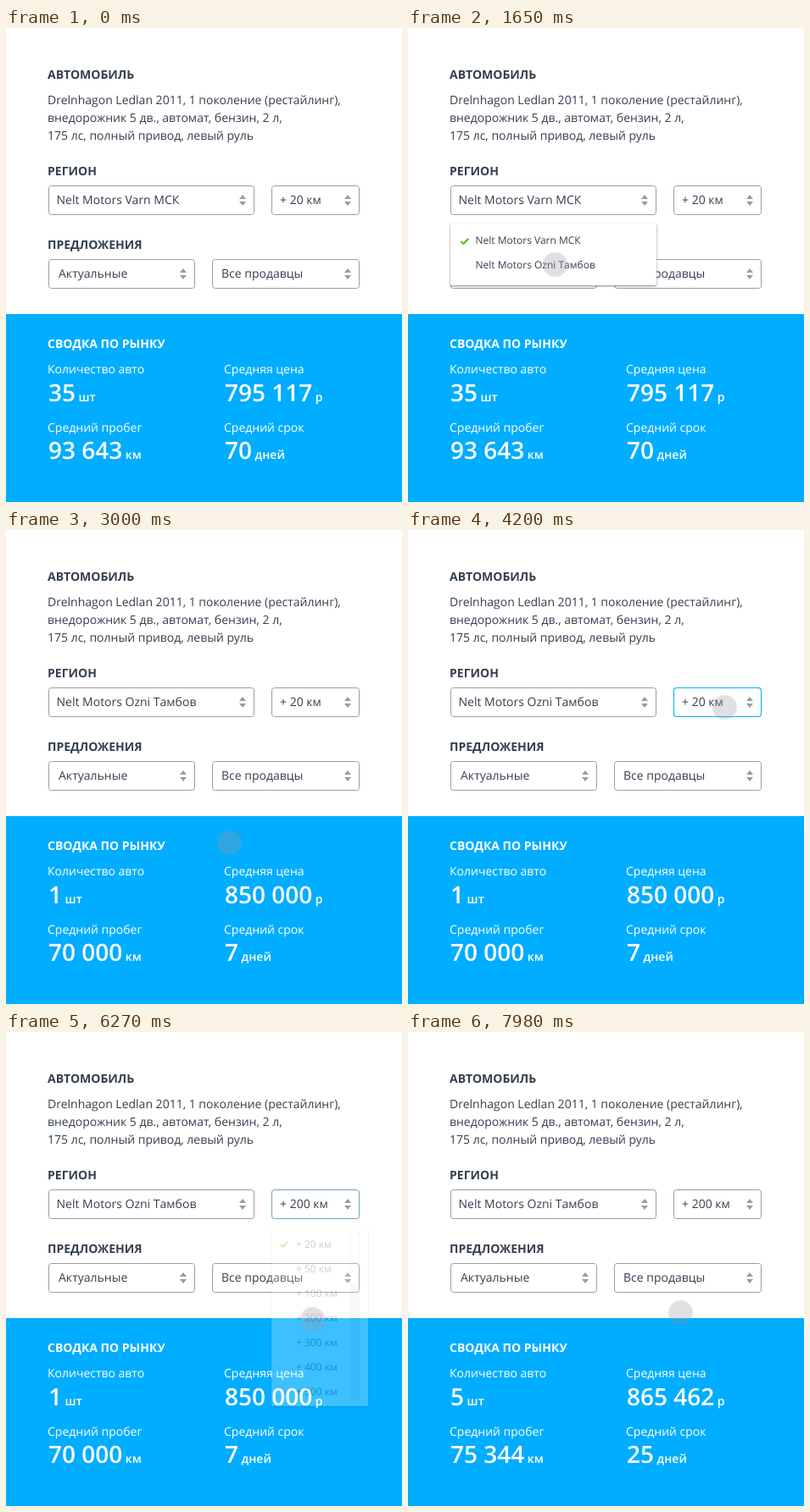
An HTML page for the animation above (8 s loop, 467 px wide and 560 px high).

```html
<!DOCTYPE html>
<html lang="ru">
<head>
<meta charset="utf-8">
<title>Сводка по рынку</title>
<style>
  html, body { margin: 0; width: 100%; height: 100%; overflow: hidden; background: #fff; }
  svg { display: block; width: 467px; height: 560px; font: 14px "Open Sans", sans-serif; fill: #343f4e; }
  text { white-space: pre; text-rendering: geometricPrecision; }
  .head { font-weight: 700; }
  .box { fill: #fff; stroke: #9b9ca3; }
  .focus { fill: none; stroke: #00adff; }
  .arrows { fill: #9a9ca1; }
  .panel { fill: #00adff; }
  .stats { fill: #fff; }
  .value { font-size: 28px; font-weight: 600; }
  .unit { font-size: 14px; }
  .menu { font-size: 12px; }
  .paper { fill: #fff; filter: drop-shadow(0 1px 1px rgba(0, 0, 0, .5)); }
  .tick { fill: none; stroke: #5fbe1b; stroke-width: 2.2; }
  .track { fill: #dfe4eb; }
  .thumb { fill: #fff; stroke: #d6dae0; }
  .grip { stroke: #d0d4da; }
  .cursor { fill: rgb(151, 153, 158); fill-opacity: .3; animation: cursor 8s ease-in-out infinite; }

  .region-menu { animation: region-menu 8s linear infinite; }
  .radius-menu { animation: radius-menu 8s linear infinite; }
  .region-focus { animation: region-focus 8s linear infinite; }
  .radius-focus { animation: radius-focus 8s linear infinite; }
  .region-old { animation: region-old 8s step-end infinite; }
  .region-new { animation: region-new 8s step-end infinite; }
  .radius-old { animation: radius-old 8s step-end infinite; }
  .radius-new { animation: radius-new 8s step-end infinite; }

  @keyframes cursor {
    0%, .2% { transform: translate(432.5px, 350.5px); opacity: 0; }
    1.5% { transform: translate(432.5px, 350.5px); opacity: 1; }
    5.625%, 18% { transform: translate(173.5px, 213.5px); }
    20.625%, 27.375% { transform: translate(173.5px, 279.5px); }
    30%, 48.75% { transform: translate(263.5px, 369.5px); }
    52.5%, 67.5% { transform: translate(373.5px, 209.5px); }
    69.375%, 99.74% { transform: translate(361.5px, 339.5px); }
    99.75%, 100% { transform: translate(321.5px, 331.5px); opacity: 1; }
  }
  @keyframes region-menu { 0%, 7.5%, 27.375%, 100% { opacity: 0; } 9%, 25.875% { opacity: 1; } }
  @keyframes radius-menu { 0%, 58.125%, 78.75%, 100% { opacity: 0; } 59.625%, 77.25% { opacity: 1; } }
  @keyframes region-focus { 0%, 4.875%, 20.25%, 100% { opacity: 0; } 5.625%, 18.375% { opacity: 1; } }
  @keyframes radius-focus { 0%, 51.375%, 78.75%, 100% { opacity: 0; } 52.4%, 77.25% { opacity: 1; } }
  @keyframes region-old { 0% { opacity: 1; } 26.625%, 100% { opacity: 0; } }
  @keyframes region-new { 0% { opacity: 0; } 26.625%, 100% { opacity: 1; } }
  @keyframes radius-old { 0% { opacity: 1; } 78%, 100% { opacity: 0; } }
  @keyframes radius-new { 0% { opacity: 0; } 78%, 100% { opacity: 1; } }
</style>
</head>
<body>
<svg viewBox="0 0 467 560">
  <defs>
    <path id="arrows" d="M-4-1.5h8L0-6.5zM-4 1.5h8L0 6.5z"/>
    <path id="tick" d="M0 3.5l3 3L8.8.2"/>
  </defs>

  <text class="head" x="49" y="60">АВТОМОБИЛЬ</text>
  <text x="49" y="90">Drelnhagon Ledlan 2011, 1 поколение (рестайлинг),</text>
  <text x="49" y="111">внедорожник 5 дв., автомат, бензин, 2 л,</text>
  <text x="49" y="132">175 лс, полный привод, левый руль</text>

  <text class="head" x="49" y="174">РЕГИОН</text>
  <rect class="box" x="50.5" y="186.5" width="242" height="34" rx="3"/>
  <rect class="focus region-focus" x="50.5" y="186.5" width="242" height="34" rx="3"/>
  <text class="region-old" x="59.5" y="208">Nelt Motors Varn МСК</text>
  <text class="region-new" x="59.5" y="208">Nelt Motors Ozni Тамбов</text>
  <rect class="box" x="313.5" y="186.5" width="103" height="34" rx="3"/>
  <rect class="focus radius-focus" x="313.5" y="186.5" width="103" height="34" rx="3"/>
  <text class="radius-old" x="323" y="208">+ 20 км</text>
  <text class="radius-new" x="323" y="208">+ 200 км</text>

  <text class="head" x="49" y="261">ПРЕДЛОЖЕНИЯ</text>
  <rect class="box" x="50.5" y="273.5" width="172" height="34" rx="3"/>
  <text x="62" y="295">Актуальные</text>
  <rect class="box" x="243.5" y="273.5" width="173" height="34" rx="3"/>
  <text x="254" y="295">Все продавцы</text>

  <g class="arrows">
    <use href="#arrows" x="279" y="203.5"/>
    <use href="#arrows" x="403" y="203.5"/>
    <use href="#arrows" x="209" y="290.5"/>
    <use href="#arrows" x="403" y="290.5"/>
  </g>

  <rect class="panel" y="338" width="467" height="222"/>
  <g class="stats" id="stats">
    <text class="head" x="49" y="378">СВОДКА ПО РЫНКУ</text>
  </g>

  <g class="menu region-menu">
    <rect class="paper" x="50" y="231" width="243" height="73" rx="2"/>
    <use class="tick" href="#tick" x="62.5" y="248.5"/>
    <text x="79.5" y="255">Nelt Motors Varn МСК</text>
    <text x="79.5" y="284">Nelt Motors Ozni Тамбов</text>
  </g>

  <g class="menu radius-menu" id="radius">
    <rect class="paper" x="313" y="231" width="114" height="211" rx="2"/>
    <use class="tick" href="#tick" x="323.5" y="247.5"/>
    <rect class="track" x="405" y="237" width="12" height="198" rx="2"/>
    <rect class="thumb" x="405.5" y="237.5" width="11" height="60" rx="2"/>
    <path class="grip" d="M408 264.5h6m-6 4h6m-6 4h6"/>
  </g>

  <circle class="cursor" r="14.5"/>
</svg>
<script>
  const LOOP = 8000, SWAP = 150, ROLLS = [2400, 6450];
  const STATS = [
    [49, 408, 441, 'Количество авто', 'шт', ['35', '1', '5']],
    [257, 408, 441, 'Средняя цена', 'р', ['795 117', '850 000', '865 462']],
    [49, 477, 509, 'Средний пробег', 'км', ['93 643', '70 000', '75 344']],
    [257, 477, 509, 'Средний срок', 'дней', ['70', '7', '25']]
  ];
  const shown = { opacity: 1, transform: 'translateY(0px)' };
  const raised = { opacity: 0, transform: 'translateY(-23px)' };
  const easing = 'cubic-bezier(.4, .2, .6, .8)';
  const key = (ms, pose) => ({ offset: ms / LOOP, easing, ...pose });

  function addText(parent, tag, x, y, content, className) {
    const node = document.createElementNS('http://www.w3.org/2000/svg', tag);
    if (x !== null) {
      node.setAttribute('x', x);
      node.setAttribute('y', y);
    }
    if (className) node.setAttribute('class', className);
    node.textContent = content;
    return parent.appendChild(node);
  }

  const radius = document.getElementById('radius');
  [20, 50, 100, 200, 300, 400, 500].forEach((km, i) =>
    addText(radius, 'text', 342, 255 + 29 * i, `+ ${km} км`));

  // Each value drops in from above while the previous one rises and fades.
  const stats = document.getElementById('stats');
  STATS.forEach(([x, labelY, valueY, label, unit, values], row) => {
    addText(stats, 'text', x, labelY, label);
    values.forEach((value, i) => {
      const node = addText(stats, 'text', x + 1, valueY, value, 'value');
      addText(node, 'tspan', null, null, ' ' + unit, 'unit');
      const enter = ROLLS[i - 1] + row * SWAP;
      const leave = ROLLS[i] + row * SWAP;
      const frames = [key(0, i ? raised : shown)];
      if (i) frames.push(key(enter, raised), key(enter + SWAP, shown));
      if (i < 2) frames.push(key(leave, shown), key(leave + SWAP, raised));
      frames.push(key(LOOP, i < 2 ? raised : shown));
      node.animate(frames, { duration: LOOP, iterations: Infinity });
    });
  });
</script>
</body>
</html>
```
